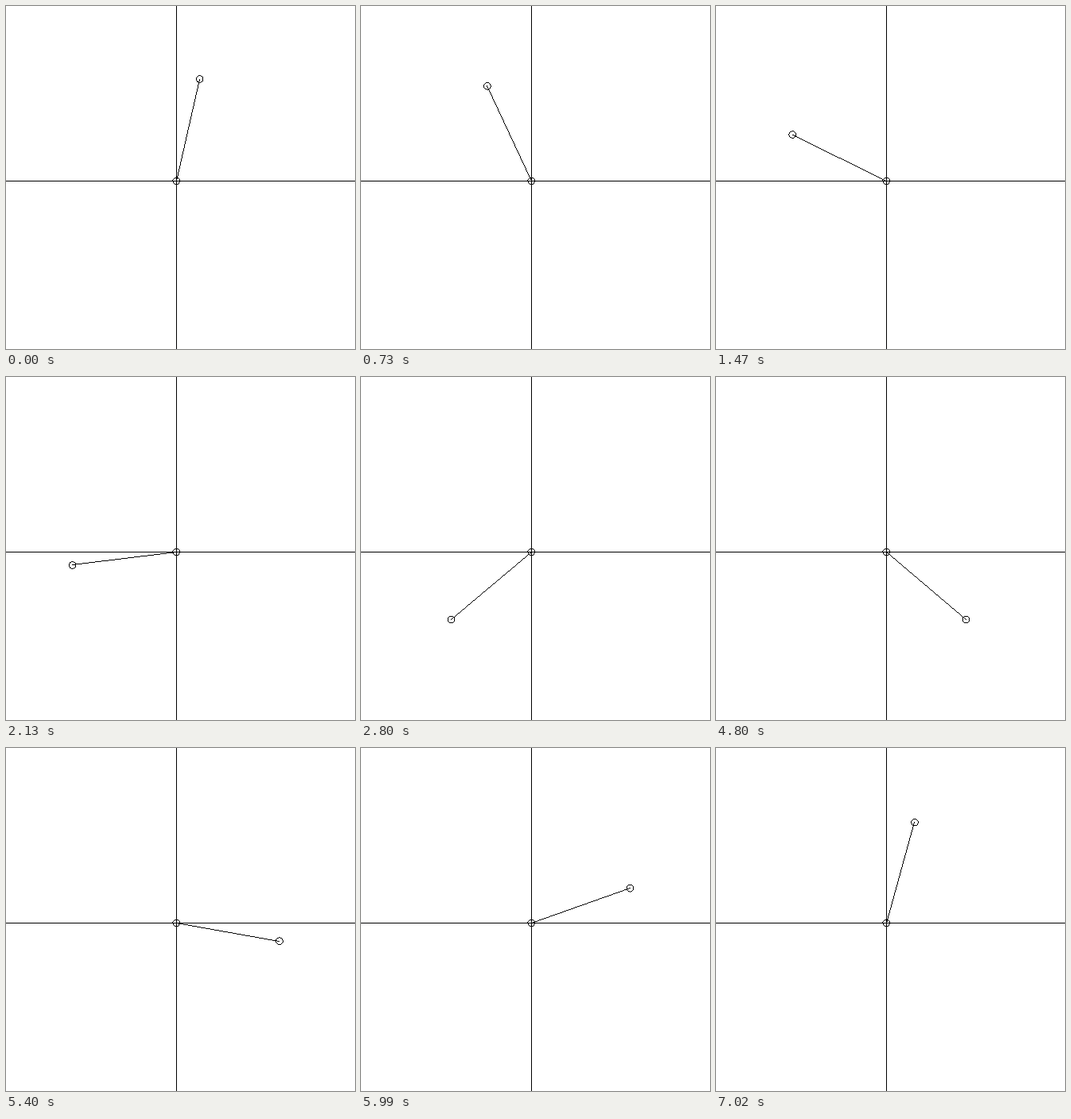
Write a matplotlib script that moves like this. It is 439 px wide and 432 px high and loops after 7.05 s.

```python
import numpy as np
import matplotlib.pyplot as plt
from matplotlib.animation import FuncAnimation
from matplotlib.collections import PolyCollection

W, H, DPI = 439, 432, 72
LOOP, TICK = 7050, 30
FRAMES = LOOP // TICK

AXIS_X, AXIS_Y = 214, 220
PIVOT = np.array([213.7, 219.9])
LENGTH, RADIUS = 131.7, 4.3
START, SWEEP, SWAY = 77.1, 357.2, 1.85

fig = plt.figure(figsize=((W + 0.001) / DPI, (H + 0.001) / DPI),
                 dpi=DPI, facecolor="white")
ax = fig.add_axes([0, 0, 1, 1])
ax.set_xlim(0, W)
ax.set_ylim(H, 0)
ax.axis("off")

ax.axvspan(AXIS_X, AXIS_X + 1, color="black", lw=0)
ax.axhspan(AXIS_Y, AXIS_Y + 1, color="black", lw=0)
hand = ax.add_collection(
    PolyCollection([], facecolors="black", edgecolors="none", linewidths=0))

CELL = np.array([[0, 0], [1, 0], [1, 1], [0, 1]])


def segment(a, b):
    """Whole pixels of a one-pixel line from a to b."""
    a, b = np.round(a), np.round(b)
    n = int(np.abs(b - a).max()) + 1
    return np.round(np.linspace(a, b, n))


def ring(center):
    """Whole pixels of a one-pixel circle, as four arcs."""
    arcs = []
    for axis in (0, 1):
        c, d = center[axis], center[1 - axis]
        reach = 0.75 * RADIUS
        k = np.arange(np.ceil(c - reach), np.floor(c + reach) + 1)
        rise = np.sqrt(RADIUS ** 2 - (k - c) ** 2)
        for side in (d - rise, d + rise):
            arc = np.column_stack([k, np.round(side)])
            arcs.append(arc[:, ::-1] if axis else arc)
    return np.concatenate(arcs)


def angle_at(i):
    """One turn, a little faster while the rod points up."""
    return np.radians(START + SWEEP * i / (FRAMES - 1)
                      + SWAY * np.sin(2 * np.pi * i / FRAMES))


def draw(i):
    a = angle_at(i)
    tip = PIVOT + LENGTH * np.array([np.cos(a), -np.sin(a)])
    pixels = np.concatenate([segment(PIVOT, tip), ring(PIVOT), ring(tip)])
    hand.set_verts(pixels[:, None, :] + CELL)
    return hand,


anim = FuncAnimation(fig, draw, frames=FRAMES, interval=TICK,
                     repeat=True, repeat_delay=0, blit=False)
plt.show()
```
